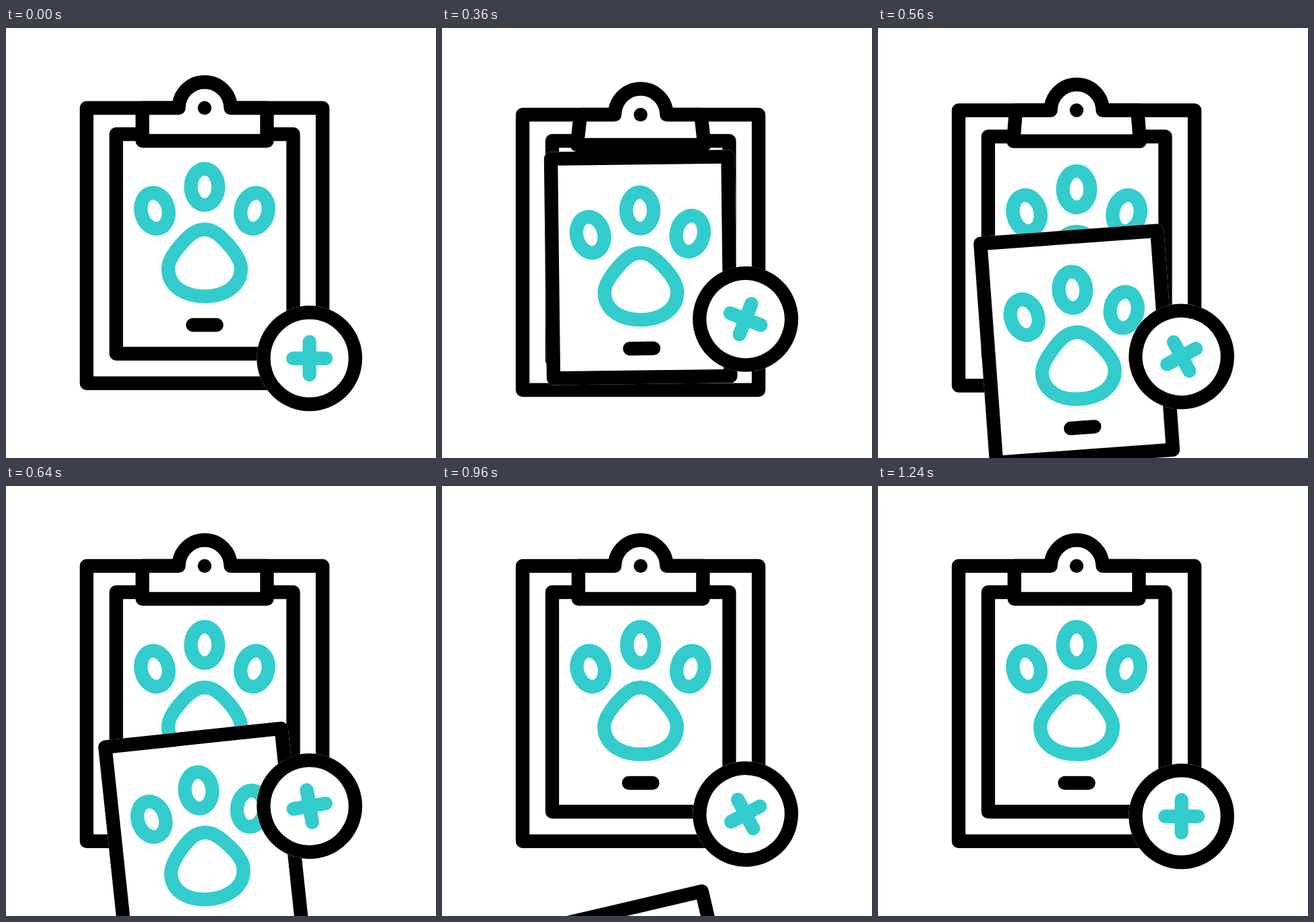
An HTML page that plays this animation: 640x640 px, repeating every 1.48 s.

```html
<!DOCTYPE html>
<html lang="en">
<head>
<meta charset="utf-8">
<title>Pet clipboard</title>
<style>
  html, body { margin: 0; width: 100%; height: 100%; overflow: hidden; background: #fff; }
  svg { display: block; width: 100%; height: 100%; }
  .ink { fill: #fff; stroke: #000; }
  .teal { fill: none; stroke: #3cc; }
</style>
</head>
<body>
<svg viewBox="0 0 640 640" stroke-width="20.4" stroke-linejoin="round" stroke-linecap="round">
  <defs>
    <g id="sheet">
      <rect x="153.8" y="147.8" width="283.9" height="347.2" rx="10.2" fill="#fff"/>
      <rect class="ink" x="164" y="158" width="263.5" height="326.8"/>
      <g class="teal">
        <ellipse cx="295.6" cy="236.5" rx="20.4" ry="27.1"/>
        <ellipse cx="221.4" cy="272" rx="20.4" ry="27.1" transform="rotate(-13 221.4 272)"/>
        <ellipse cx="369.9" cy="272" rx="20.4" ry="27.1" transform="rotate(13 369.9 272)"/>
        <path d="M295.6 299.8C307 299.8 316 306 327 318C341 333 349.8 346 349.8 358C349.8 385 325 399.4 295.6 399.4S241.4 385 241.4 358C241.4 346 250.2 333 264.2 318C275.2 306 284.2 299.8 295.6 299.8Z"/>
      </g>
      <path class="ink" d="M278 442H313.4"/>
    </g>
  </defs>
  <g id="board">
    <rect class="ink" x="120" y="119" width="351.2" height="409.7"/>
    <use href="#sheet"/>
    <use href="#sheet" id="falling"/>
    <path class="ink" id="clip"/>
    <circle cx="295.6" cy="119" r="10.2"/>
  </g>
  <g id="badge">
    <circle r="78.5" fill="#fff"/>
    <circle class="ink" r="68.3"/>
    <path class="teal" d="M-24.4 0H24.4M0 -24.4V24.4"/>
  </g>
</svg>
<script>
  const LOOP = 1480, STEP = 40, REST = 3, LAST = 28;
  const [board, falling, clip, badge] =
    ['board', 'falling', 'clip', 'badge'].map(id => document.getElementById(id));

  // Eased progress of n between steps a and b
  const ease = (n, a, b) => {
    const x = Math.min(1, Math.max(0, (n - a) / (b - a)));
    return x * x * (3 - 2 * x);
  };
  // Rises from a to b, falls back from c to d
  const pulse = (n, a, b, c, d) => ease(n, a, b) - ease(n, c, d);

  function clipPath(open) {
    const top = 92.7 - 3 * open, low = 92.7 + 2 * open, y = 168 - 4 * open, mid = 295.7;
    return `M${mid - top} 119H257.1A38.6 38.6 0 0 1 334.3 119H${mid + top}L${mid + low} ${y}H${mid - low}Z`;
  }

  function draw(now) {
    const tick = Math.floor((now % LOOP) / STEP);
    const n = Math.min(LAST, Math.max(0, tick - REST));

    board.setAttribute('transform', `translate(0 ${10 * pulse(n, 0, 5, 8, 13)})`);
    clip.setAttribute('d', clipPath(pulse(n, 0, 3, 10, 13)));

    const fall = ease(n, 3, 26);
    falling.style.display = fall > 0 && fall < 1 ? '' : 'none';
    falling.setAttribute('transform',
      `translate(0 ${536 * fall}) rotate(${-15 * fall} 295.7 321.4)`);

    const hop = 65.2 * pulse(n, 0, 5, 5, 10) + 18 * pulse(n, 10, 14, 14, 18)
      + 3.5 * pulse(n, 18, 21, 21, 24);
    badge.setAttribute('transform',
      `translate(451.7 ${491.7 - hop}) rotate(${180 * ease(n, 0, LAST)})`);
  }

  function frame() {
    draw(performance.now());
    requestAnimationFrame(frame);
  }
  frame();
</script>
</body>
</html>
```
